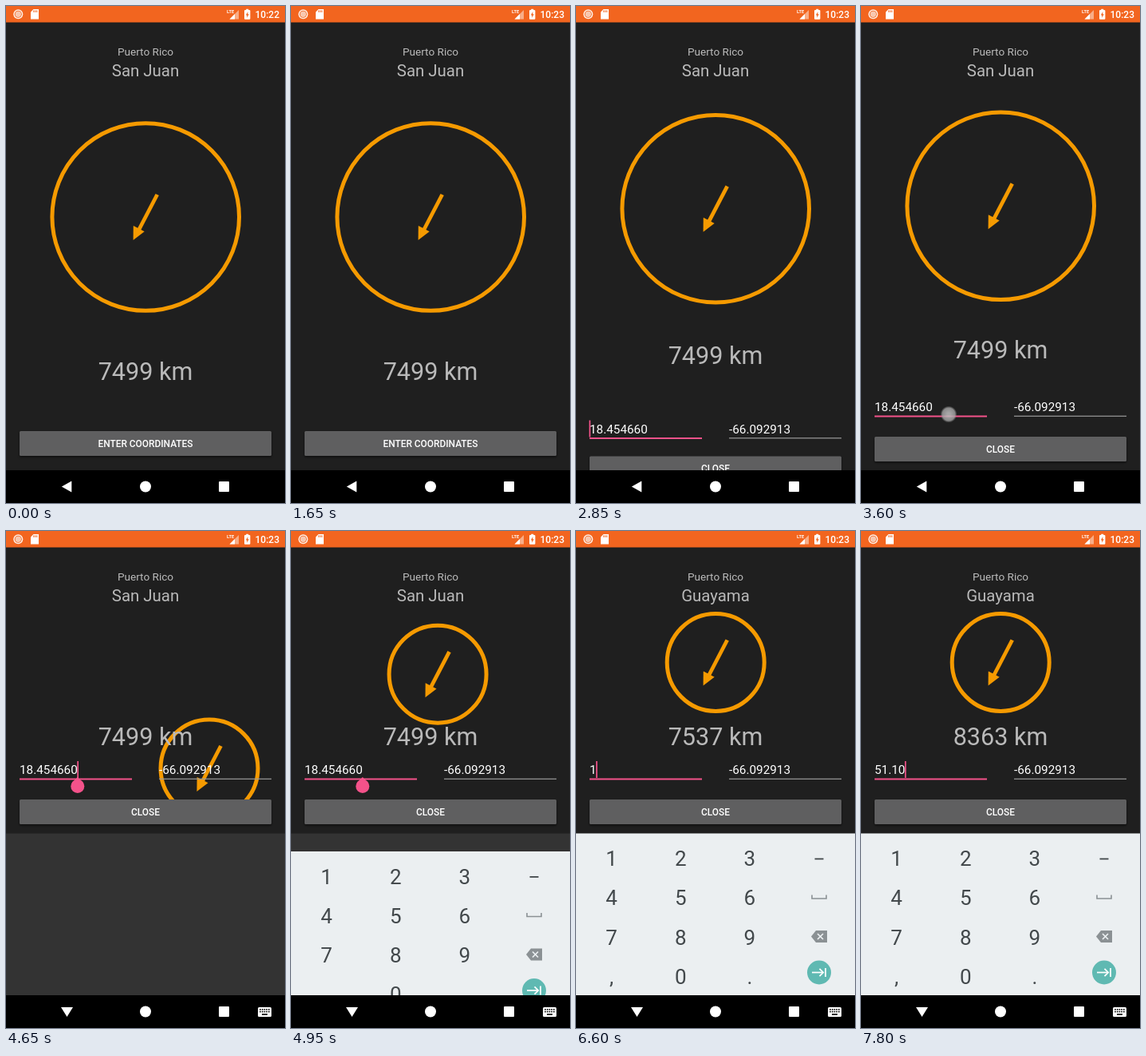
Recreate the animation shown at these times as an HTML page with a canvas. Size 350 by 622 pixels, loop 8 s.

```html
<!DOCTYPE html>
<html lang="en">
<head>
<meta charset="utf-8">
<title>Compass</title>
<style>
html, body { margin: 0; width: 100%; height: 100%; overflow: hidden; background: #000; }
canvas { display: block; width: 350px; height: 622px; }
</style>
</head>
<body>
<canvas id="stage"></canvas>
<script>
const W = 350, H = 622, LOOP = 8000, STEP = 150;
const ORANGE = '#f59a00', PINK = '#f4528a', GREY = '#bababa';
const canvas = document.getElementById('stage');
const ctx = canvas.getContext('2d');
const dpr = window.devicePixelRatio || 1;
canvas.width = W * dpr;
canvas.height = H * dpr;

const clamp = v => Math.max(0, Math.min(1, v));
const span = (t, a, b) => clamp((t - a) / (b - a));
const mix = (a, b, p) => a + (b - a) * p;
const easeOut = p => 1 - (1 - p) * (1 - p);
const easeBoth = p => (1 - Math.cos(Math.PI * p)) / 2;

function rect(x, y, w, h, color) {
  ctx.fillStyle = color;
  ctx.fillRect(x, y, w, h);
}

function disc(x, y, r, color) {
  ctx.fillStyle = color;
  ctx.beginPath();
  ctx.arc(x, y, r, 0, Math.PI * 2);
  ctx.fill();
}

function trace(points) {
  ctx.beginPath();
  points.forEach(([x, y], i) => i ? ctx.lineTo(x, y) : ctx.moveTo(x, y));
}

function poly(color, ...points) {
  trace(points);
  ctx.fillStyle = color;
  ctx.fill();
}

function line(color, width, ...points) {
  trace(points);
  ctx.strokeStyle = color;
  ctx.lineWidth = width;
  ctx.stroke();
}

function rounded(x, y, w, h, r, color) {
  ctx.fillStyle = color;
  ctx.beginPath();
  ctx.roundRect(x, y, w, h, r);
  ctx.fill();
}

function text(str, x, y, size, color, align = 'center', weight = 400) {
  ctx.font = `${weight} ${size}px Roboto, sans-serif`;
  ctx.textAlign = align;
  ctx.fillStyle = color;
  ctx.fillText(str, x, y);
  return ctx.measureText(str).width;
}

// Latitude field: digits are erased one by one, then the new value is typed.
function latitude(t) {
  const old = '18.454660', fresh = '51.10';
  if (t < 5400) return old;
  if (t < 6450) return old.slice(0, 8 - Math.min(5, Math.floor((t - 5400) / STEP)));
  if (t < 6900) return old.slice(0, 2 - Math.floor((t - 6450) / STEP));
  if (t < 7500) return fresh.slice(0, Math.min(3, 1 + Math.floor((t - 6900) / STEP)));
  return t < 7650 ? '51.1' : fresh;
}

function distance(t) {
  if (t < 5850) return 7499;
  if (t < 6150) return t < 6000 ? 7500 : 7504;
  return t < 6900 ? 7537 : 8363;
}

function layout(t) {
  if (t >= 4500) {
    const p = easeOut(span(t, 4650, 5100));
    return {
      cx: mix(255, 175.2, p), cy: mix(297, 164.5, p), r: 61,
      km: 268, edit: 304, button: 336, label: 'CLOSE'
    };
  }
  const p = easeBoth(span(t, 2250, 3150));
  const view = { cx: 175.2, cy: mix(264, 250.3, p), r: 117.3, km: mix(468, 441, p) };
  if (t < 2550) {
    const drop = 60 * span(t, 2100, 2550);
    return { ...view, edit: 0, button: 532 + drop, label: 'ENTER COORDINATES' };
  }
  const q = easeOut(span(t, 2550, 3150));
  return { ...view, edit: mix(617, 507, q), button: mix(637, 539, q), label: 'CLOSE' };
}

function compass(cx, cy, r) {
  ctx.strokeStyle = ORANGE;
  ctx.lineWidth = 5;
  ctx.beginPath();
  ctx.arc(cx, cy, r, 0, Math.PI * 2);
  ctx.stroke();
  ctx.save();
  ctx.translate(cx, cy);
  line(ORANGE, 4.8, [14.5, -28], [-9, 17]);
  poly(ORANGE, [-15.6, 29], [-15.4, 11], [-1.5, 18.2]);
  ctx.restore();
}

function button(y, label) {
  ctx.save();
  ctx.shadowColor = 'rgba(0,0,0,.6)';
  ctx.shadowBlur = 3 * dpr;
  ctx.shadowOffsetY = 1.5 * dpr;
  rounded(17, y, 316, 31, 1.5, '#5f5f60');
  ctx.restore();
  text(label, 175, y + 19.8, 11.9, '#fff', 'center', 500);
}

function fields(t, y) {
  const value = latitude(t);
  rect(17, y + 5.5, 141, 2, PINK);
  rect(192, y + 5.7, 141, 1.2, '#999');
  const width = text(value, 17, y, 15.3, '#fff', 'left');
  text('-66.092913', 192, y, 15.3, '#fff', 'left');

  const picked = t >= 3750;
  const x = picked ? 17 + width : 17;
  const blink = t < 3750 ? t < 3150 : t < 5400 ? t % 1050 < 600 : true;
  if (blink) rect(x - .5, y - 16, 1.7, 21, PINK);
  if (picked && t < 5400) {
    poly(PINK, [x, y + 4], [x + 7, y + 11], [x - 7, y + 11]);
    disc(x, y + 15.5, 8.5, PINK);
  }
}

function keyboard(y) {
  const ink = '#42484b', soft = '#8b9194';
  ctx.save();
  ctx.beginPath();
  ctx.rect(0, 378, W, 203);
  ctx.clip();
  ctx.translate(0, y);
  rect(0, 0, W, 203, '#ebeff1');
  ['123', '456', '789', ',0.'].forEach((row, j) => {
    [...row].forEach((key, i) => text(key, 44.5 + i * 86.7, 40.5 + j * 49.3, 26, ink));
  });
  rect(299.5, 31, 11, 1.8, ink);
  line(soft, 1.6, [296, 77], [296, 81.5], [314, 81.5], [314, 77]);
  poly(soft, [295, 129], [301, 121.5], [315, 121.5], [315, 136.5], [301, 136.5]);
  line('#ebeff1', 1.7, [303, 125.5], [310, 132.5]);
  line('#ebeff1', 1.7, [310, 125.5], [303, 132.5]);
  disc(305, 174, 15, '#5fb9b2');
  line('#fff', 1.7, [296, 174], [310, 174]);
  line('#fff', 1.7, [305.5, 169.3], [310.2, 174], [305.5, 178.7]);
  line('#fff', 1.8, [313, 168.5], [313, 179.5]);
  ctx.restore();
}

function statusBar(t) {
  rect(0, 0, W, 20.5, '#f2651f');
  disc(15.3, 10.3, 6, '#fff0e8');
  disc(15.3, 10.3, 4.5, '#f2651f');
  disc(15.3, 10.3, 3.7, '#f8c8b0');
  poly('#fff', [34.5, 4], [41, 4], [41, 16.5], [31, 16.5], [31, 7.5]);
  for (let i = 0; i < 3; i++) rect(34.3 + i * 2, 5.3, 1, 2.6, '#f2651f');
  text('LTE', 277, 9, 5.6, '#fff', 'left', 700);
  poly('#f8ad87', [292, 5], [292, 16.5], [280.5, 16.5]);
  poly('#fff', [287, 10], [287, 16.5], [280.5, 16.5]);
  rounded(299, 5, 7.4, 11.8, 1, '#fff');
  rect(301.2, 3.8, 3, 2, '#fff');
  poly('#f2651f', [303.5, 7], [300.8, 11.6], [302.4, 11.6], [302.1, 14.8], [304.8, 10.2], [303.2, 10.2]);
  text(t < 1650 ? '10:22' : '10:23', 343, 14.7, 12, '#fff', 'right', 500);
}

function navBar(typing) {
  rect(0, 581, W, 41, '#000');
  if (typing) poly('#fff', [69, 596], [84, 596], [76.5, 608]);
  else poly('#fff', [69.8, 601.5], [82.3, 594.5], [82.3, 608.5]);
  disc(175, 601.5, 7, '#fff');
  rounded(267, 595, 13, 13, 1, '#fff');
  if (!typing) return;
  rounded(316, 596, 17, 12, 1.5, '#fff');
  for (let i = 0; i < 10; i++) {
    rect(318.2 + i % 5 * 2.7, 598 + Math.floor(i / 5) * 2.8, 1.6, 1.6, '#000');
  }
  rect(321, 604.2, 7, 1.6, '#000');
}

function touch(x, y) {
  const glow = ctx.createRadialGradient(x, y, 2, x, y, 10.5);
  glow.addColorStop(0, 'rgba(190,190,190,.85)');
  glow.addColorStop(.7, 'rgba(165,165,165,.8)');
  glow.addColorStop(1, 'rgba(140,140,140,0)');
  disc(x, y, 10.5, glow);
}

function draw(t) {
  const view = layout(t);
  const typing = t >= 4050, resized = t >= 4500;
  ctx.setTransform(dpr, 0, 0, dpr, 0, 0);
  rect(0, 0, W, H, '#1f1f1f');
  text('Puerto Rico', 175, 62.3, 13.6, GREY);
  text(t < 6450 ? 'San Juan' : 'Guayama', 175, 88, 20.4, GREY);

  ctx.save();
  ctx.beginPath();
  ctx.rect(0, 21, W, (resized ? 336 : 581) - 21);
  ctx.clip();
  compass(view.cx, view.cy, view.r);
  ctx.restore();

  text(distance(t) + ' km', 175, view.km, 30.6, GREY);
  if (view.edit) fields(t, view.edit);
  button(view.button, view.label);

  if (resized) {
    rect(0, 378.5, W, 203, '#333');
    keyboard(mix(581, 378.5, easeOut(span(t, 4650, 5100))));
  }
  if (t >= 1050 && t < 1200) touch(193, 263);
  if (t >= 1200 && t < 1350) touch(239, 343);
  if (t >= 3600 && t < 3750) touch(110, 511);
  statusBar(t);
  navBar(typing);
}

const start = performance.now();
function tick() {
  const t = (performance.now() - start) % LOOP;
  draw(Math.floor(t / STEP) * STEP);
  requestAnimationFrame(tick);
}
tick();
</script>
</body>
</html>
```
